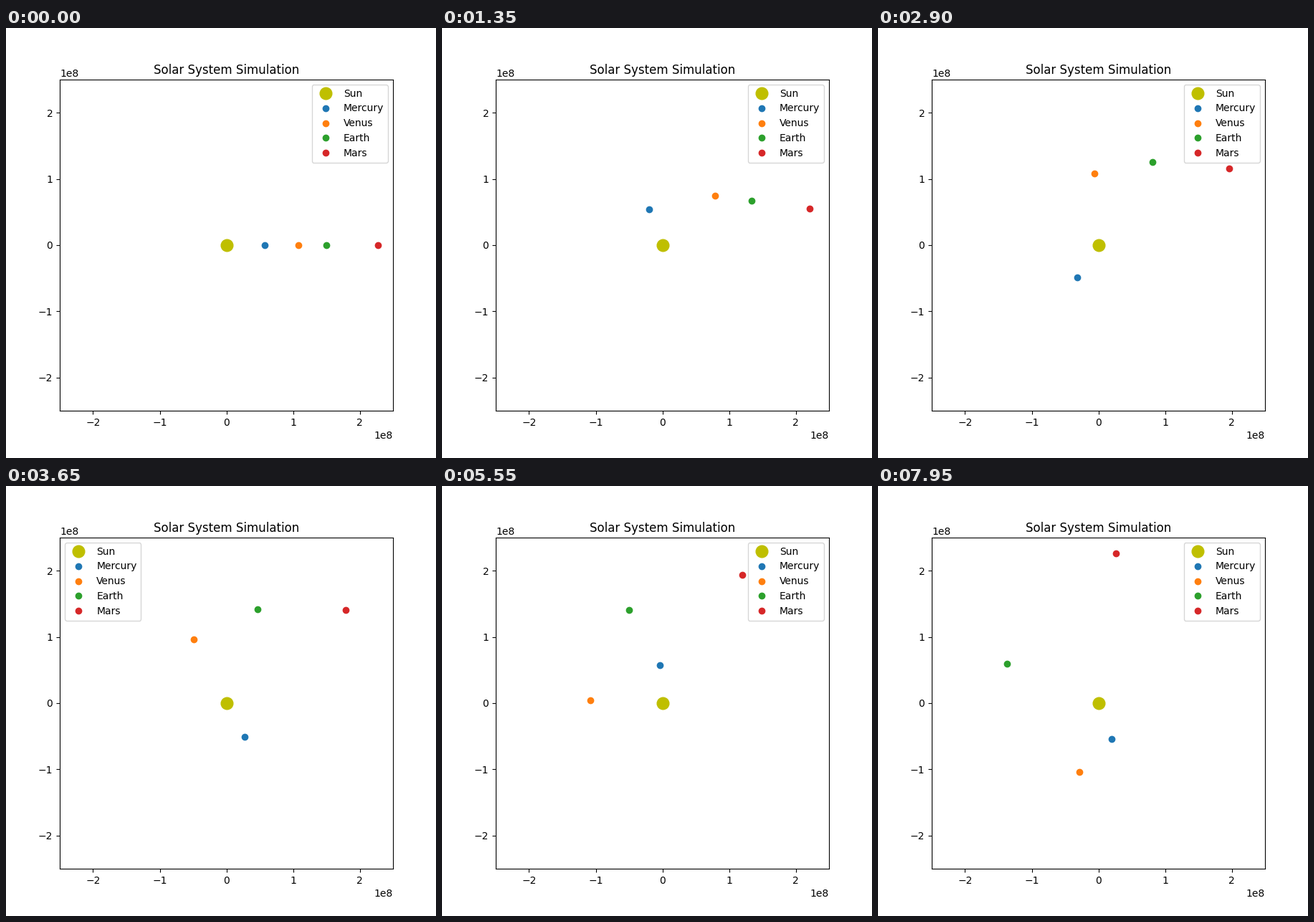
A matplotlib script for the animation above (8000 ms loop, 600x600 px).

```python
import math

import matplotlib.pyplot as plt
from matplotlib.animation import FuncAnimation

FRAMES = 160
INTERVAL = 50  # ms, one simulated day per frame
LIMIT = 2.5e8  # km

# name: (orbit radius in km, period in days)
ORBITS = {
    "Mercury": (57.9e6, 88.0),
    "Venus": (108.2e6, 224.7),
    "Earth": (149.6e6, 365.2),
    "Mars": (227.9e6, 687.0),
}

fig, ax = plt.subplots(figsize=(6, 6), dpi=100)
ax.set_xlim(-LIMIT, LIMIT)
ax.set_ylim(-LIMIT, LIMIT)
ax.set_title("Solar System Simulation")

ax.plot([0], [0], "yo", markersize=12, label="Sun")
planets = {
    name: ax.plot([radius], [0], "o", color=f"C{i}", label=name)[0]
    for i, (name, (radius, _)) in enumerate(ORBITS.items())
}
# "best" is re-evaluated on every draw, so the legend dodges the planets
ax.legend(loc="best")


def update(day):
    for name, (radius, period) in ORBITS.items():
        angle = 2 * math.pi * day / period
        planets[name].set_data([radius * math.cos(angle)],
                               [radius * math.sin(angle)])
    return list(planets.values())


anim = FuncAnimation(fig, update, frames=FRAMES, interval=INTERVAL,
                     repeat=True, repeat_delay=0, blit=False)
plt.show()
```
